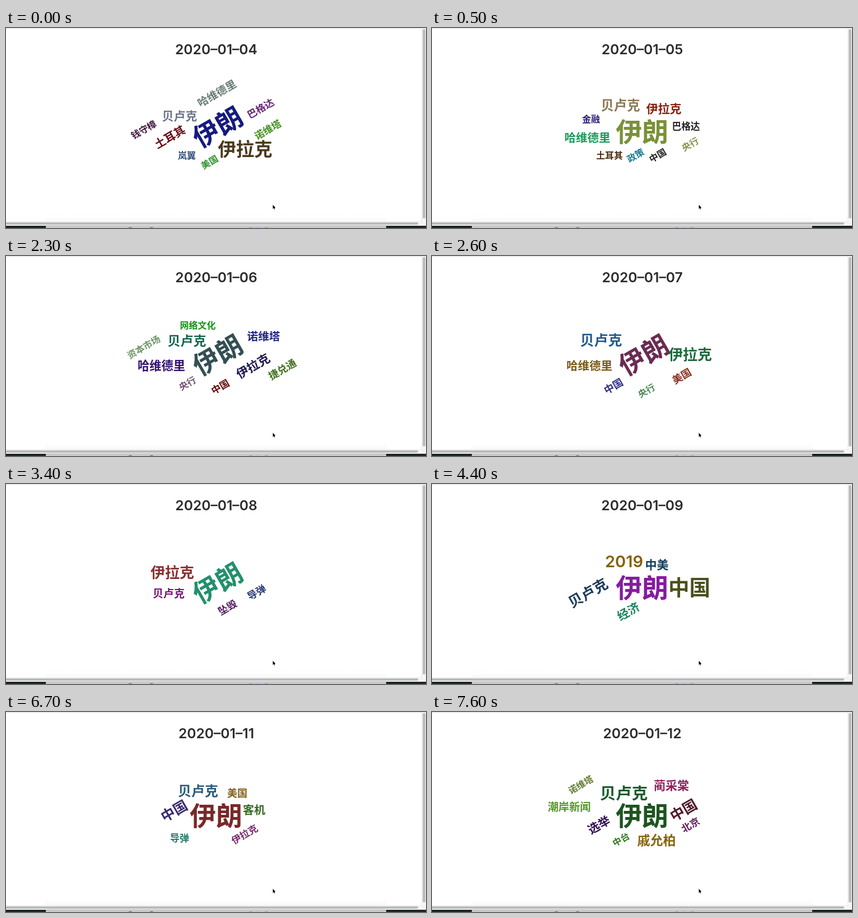
An HTML page with a canvas that plays this animation: 750 by 358 pixels, repeating every 8000 ms.

```html
<!DOCTYPE html>
<html lang="zh-CN">
<head>
<meta charset="utf-8">
<title>Daily word cloud</title>
<style>
  html, body { margin: 0; width: 100%; height: 100%; overflow: hidden; background: #fff; }
  canvas { display: block; width: 750px; height: 358px; }
</style>
</head>
<body>
<canvas id="stage"></canvas>
<script>
const W = 750, H = 358, LOOP = 8000, DAY = 1000, FIRST_CHANGE = 400;
const FONT = 'Inter, "Noto Sans CJK SC", "Noto Sans CJK", sans-serif';
const canvas = document.getElementById('stage');
const ctx = canvas.getContext('2d');
const ratio = window.devicePixelRatio || 1;
canvas.width = W * ratio;
canvas.height = H * ratio;

const TILT = -Math.PI / 6;
const days = [];
const day = (date, ...words) => days.push({ date, words });
const flat = (text, x, y, size, color) => ({ text, x, y, size, color, angle: 0 });
const tilt = (text, x, y, size, color) => ({ text, x, y, size, color, angle: TILT });
const flatHub = color => flat('伊朗', 375, 186, 47, color);
const tiltHub = color => tilt('伊朗', 377.7, 177.5, 47, color);

day('04',
  tiltHub('#161a80'),
  flat('伊拉克', 427, 217, 32.5, '#4a3a1c'),
  flat('贝卢克', 310, 157, 21, '#6b7488'),
  tilt('哈维德里', 376.5, 117, 19, '#6b7d74'),
  tilt('巴格达', 454.5, 144, 17.3, '#652876'),
  tilt('诺维塔', 467.5, 182, 17.3, '#45911f'),
  tilt('钱守樟', 246, 182, 16.3, '#421840'),
  tilt('土耳其', 292.5, 195, 20, '#660f18'),
  flat('岚翼', 323, 228, 16, '#2c4a73'),
  tilt('美国', 363.5, 240, 16, '#2f922f'));

day('05',
  flatHub('#7a9138'),
  flat('贝卢克', 336.5, 138, 23.3, '#8a7852'),
  flat('伊拉克', 414, 144, 21, '#8a2010'),
  flat('金融', 284, 163, 16, '#2a1a7a'),
  flat('巴格达', 453.5, 176, 16.7, '#222222'),
  flat('哈维德里', 277.5, 196, 20.5, '#1a9a5a'),
  flat('土耳其', 317, 228, 15.8, '#4a2a10'),
  tilt('政策', 363.5, 228, 16, '#1a7a94'),
  tilt('中国', 403, 228, 16, '#222222'),
  tilt('央行', 461, 208, 16, '#84944a'));

day('06',
  tiltHub('#344f54'),
  flat('网络文化', 342.5, 124, 16, '#179217'),
  flat('贝卢克', 323, 151, 23, '#12664f'),
  flat('诺维塔', 460, 144, 19.7, '#252585'),
  tilt('资本市场', 246, 163, 16.3, '#6d9566'),
  flat('哈维德里', 277.5, 196, 21.2, '#33106e'),
  tilt('央行', 324, 228, 16, '#705470'),
  tilt('中国', 382.5, 234, 17, '#640c0c'),
  tilt('伊拉克', 441, 197, 21.7, '#1e1850'),
  tilt('捷兑通', 493.5, 203, 18, '#3f701c'));

day('07',
  tiltHub('#6a2b52'),
  flat('贝卢克', 302, 151, 25, '#245a8a'),
  flat('哈维德里', 281, 196, 20.5, '#7a5a18'),
  flat('伊拉克', 461, 176, 26, '#1d6a3c'),
  tilt('美国', 446, 215, 18, '#8a3020'),
  tilt('中国', 324, 233, 18, '#30308a'),
  tilt('央行', 383, 241, 16, '#4a8a50'));

day('08',
  tiltHub('#22906c'),
  flat('伊拉克', 297, 158, 26, '#8a3030'),
  flat('贝卢克', 290.5, 196, 19, '#7a107a'),
  tilt('坠毁', 395.5, 221, 17.5, '#54185f'),
  tilt('导弹', 447.5, 194, 17.5, '#283878'));

day('09',
  flatHub('#861ba0'),
  flat('2019', 343, 138, 29, '#856000'),
  flat('中美', 401.5, 144, 21, '#123f5a'),
  tilt('贝卢克', 278.5, 195, 25.5, '#1d3a5c'),
  flat('中国', 459.5, 185, 37.5, '#4a501c'),
  tilt('经济', 350.5, 228, 21, '#1c8260'));

day('10',
  flatHub('#1b2b80'),
  flat('贝卢克', 381.5, 138, 24.7, '#5a0f72'),
  tilt('巡视组', 291.5, 170, 26, '#4a5622'),
  flat('美国', 440.5, 150, 15.8, '#6e5210'),
  tilt('台湾', 480.5, 150, 15.7, '#441d14'),
  flat('春运', 454, 183, 20.5, '#1e8050'),
  flat('5G', 310, 196, 18, '#93705a'),
  flat('坠机', 310, 228, 15.8, '#7f2f66'),
  tilt('中国', 357, 227, 18, '#1c1c1c'),
  tilt('伊拉克', 428.5, 221, 17.3, '#4a8635'));

day('11',
  flatHub('#7a2828'),
  flat('贝卢克', 343, 141, 24, '#285a78'),
  flat('客机', 443, 176, 20, '#386a20'),
  tilt('中国', 300, 177, 25, '#3a2a70'),
  flat('美国', 413, 145, 18, '#806018'),
  flat('导弹', 310, 226, 17, '#207a6a'),
  tilt('伊拉克', 426, 219, 17, '#7a2a70'));

day('12',
  flatHub('#1d5520'),
  tilt('诺维塔', 265.5, 130, 16, '#647c36'),
  flat('贝卢克', 342.5, 145, 28.5, '#1b5c2c'),
  flat('蔺采棠', 427.5, 131, 21, '#8f205a'),
  flat('潮岸新闻', 245, 170, 19.2, '#55982a'),
  tilt('选举', 298, 202, 21, '#320e52'),
  tilt('中国', 449, 175.5, 25.5, '#50182c'),
  tilt('北京', 461.5, 202, 17.3, '#601c58'),
  tilt('中台', 337.5, 228, 16, '#287e1c'),
  flat('戚允柏', 401, 229, 23, '#84650c'));

function box(x, y, w, h, color, radius = 0) {
  ctx.fillStyle = color;
  ctx.beginPath();
  ctx.roundRect(x, y, w, h, radius);
  ctx.fill();
}

function drawWord({ text, x, y, size, color, angle }) {
  const latin = /^[\x20-\x7e–]+$/.test(text);
  ctx.save();
  ctx.translate(x, y);
  ctx.rotate(angle);
  ctx.font = `600 ${size}px ${FONT}`;
  ctx.textAlign = 'center';
  ctx.fillStyle = color;
  ctx.fillText(text, 0, size * (latin ? 0.364 : 0.37));
  ctx.restore();
}

function drawDock() {
  box(0, 354, W, 4, '#1c2622');
  box(71, 353, 608, 12, '#c9c9cb', 4);
  const icon = (x, color) => {
    ctx.fillStyle = color;
    ctx.beginPath();
    ctx.arc(x, 361.5, 5, 0, Math.PI * 2);
    ctx.fill();
  };
  icon(222, '#a8646a');
  icon(260, '#a8646a');
  icon(437, '#9fb08c');
  icon(450, '#c9c46a');
  icon(465, '#9fb08c');
}

function drawWindow() {
  box(0, 0, W, H, '#fff');
  box(0, 0, W, 1, '#dedede');
  const haze = ctx.createLinearGradient(0, 334, 0, 346);
  haze.addColorStop(0, 'rgba(0,0,0,0)');
  haze.addColorStop(1, 'rgba(0,0,0,0.02)');
  box(70, 334, 610, 12, haze);
  box(742, 1, 8, 353, '#f7f7f7');
  box(742, 1, 1, 345, '#e8e8e8');
  box(0, 346, W, 8, '#f5f5f5');
  box(0, 346, 742, 1, '#e8e8e8');
  box(744, 2, 5, 339, '#bdbdbd', 2.5);
  box(-3, 348, 739, 4, '#b9b9b9', 2);
  drawDock();
}

function drawCursor() {
  ctx.save();
  ctx.translate(476.5, 316.5);
  ctx.beginPath();
  [[0, 0], [0, 7.2], [1.6, 5.8], [2.7, 8.3], [3.8, 7.8], [2.8, 5.4], [4.8, 5.2]]
    .forEach(([x, y]) => ctx.lineTo(x, y));
  ctx.closePath();
  ctx.fillStyle = '#000';
  ctx.fill();
  ctx.restore();
}

function draw(now) {
  const t = now % LOOP;
  const { date, words } = days[Math.floor((t + DAY - FIRST_CHANGE) / DAY)];
  ctx.setTransform(ratio, 0, 0, ratio, 0, 0);
  drawWindow();
  drawWord(flat(`2020–01–${date}`, 375.5, 38, 24.6, '#2b2b2b'));
  words.forEach(drawWord);
  drawCursor();
  requestAnimationFrame(draw);
}
requestAnimationFrame(draw);
</script>
</body>
</html>
```
